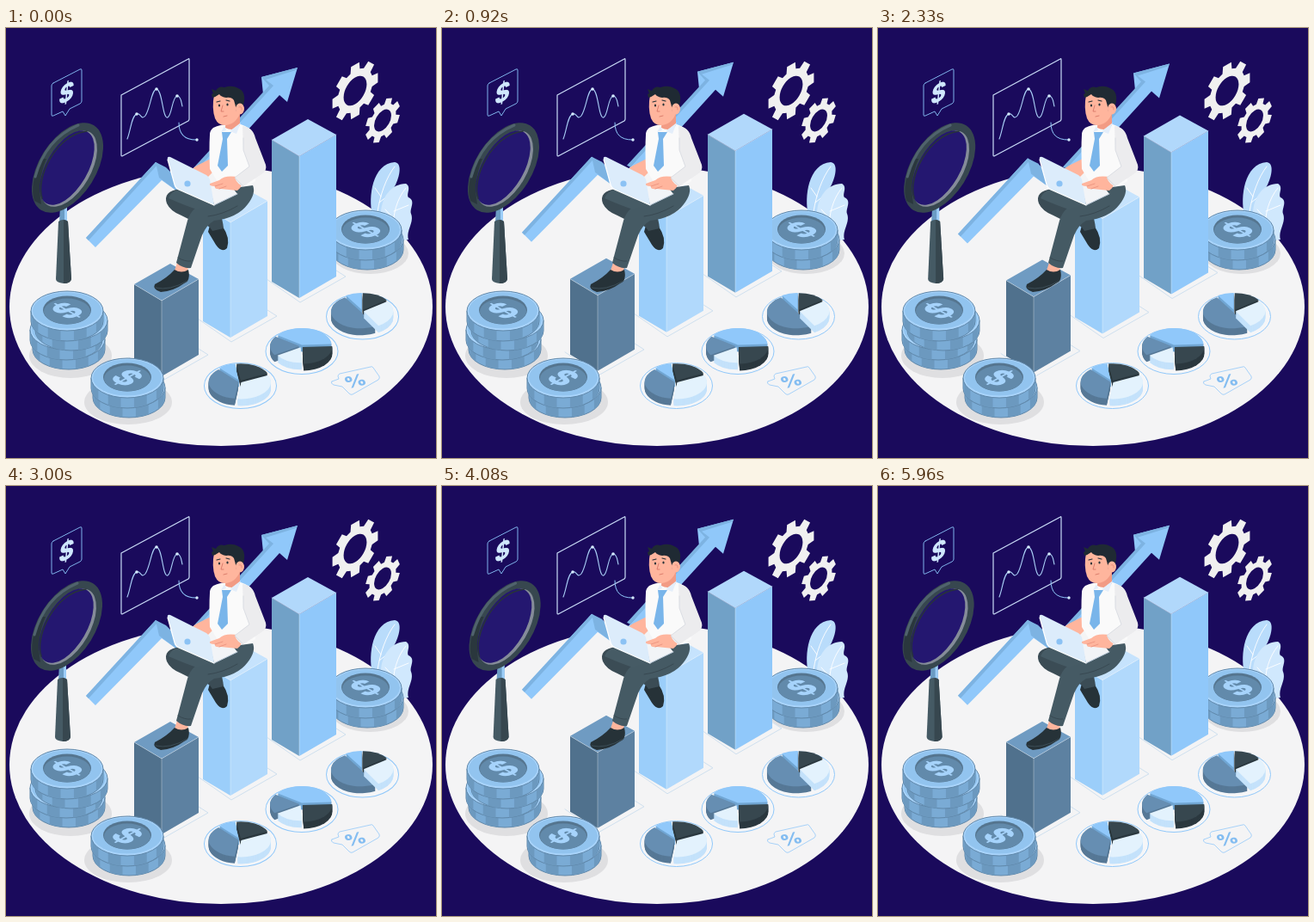
Recreate the animation shown at these times as an HTML page. Size 500 px wide and 500 px high, loop 6000 ms.

```html
<!DOCTYPE html>
<html lang="en">
<head>
<meta charset="utf-8">
<title>Business growth</title>
<style>
html, body { margin: 0; width: 100%; height: 100%; overflow: hidden; background: #1a0a5c; }
svg { display: block; width: 100%; height: 100%; }
text { font-family: Inter, Arial, sans-serif; font-weight: 800; text-anchor: middle; }
</style>
</head>
<body>
<svg id="stage" viewBox="0 0 500 500"></svg>
<script>
const path = (d, fill, extra = '') => `<path d="${d}" fill="${fill}" ${extra}/>`;
const line = (d, color, width = 1) =>
  path(d, 'none', `stroke="${color}" stroke-width="${width}" stroke-linecap="round" stroke-linejoin="round"`);
const oval = (x, y, rx, ry, fill, extra = '') =>
  `<ellipse cx="${x}" cy="${y}" rx="${rx}" ry="${ry}" fill="${fill}" ${extra}/>`;
const poly = (pts, fill, extra = '') => `<polygon points="${pts}" fill="${fill}" ${extra}/>`;
const group = (id, body) => `<g id="${id}">${body}</g>`;
const sign = (char, x, y, size, fill, matrix) =>
  `<text transform="matrix(${matrix},${x},${y})" y="${size * .36}" font-size="${size}" fill="${fill}">${char}</text>`;

const BLUE = '#90c8fa', STEEL = '#668eb2', DARK = '#37474f', PALE = '#e3f2fd';

// Isometric column: front edge x, its top and bottom, face colours
function bar(x, top, bottom, left, right, lid) {
  const back = top - 43, l = x - 32, r = x + 43;
  return line(`M${l - 6} ${bottom - 22}L${x + 1} ${bottom + 5}L${r + 11} ${bottom - 25}L${r} ${bottom - 32}`, '#cfe0ef') +
    poly([l, top - 19, x, top, x, bottom, l, bottom - 19], left) +
    poly([x, top, r, top - 25, r, bottom - 25, x, bottom], right) +
    poly([x + 10, back, r, top - 25, x, top, l, top - 19], lid) +
    line(`M${l} ${top - 19}L${x} ${top}L${r} ${top - 25}M${x} ${top}V${bottom}`, '#ffffff66', .8);
}

function slice(cx, cy, rx, ry, from, to, fill, side, h = 8) {
  const rad = Math.PI / 180, mid = (from + to) / 2 * rad;
  const point = a => [cx + Math.cos(a * rad) * rx, cy + Math.sin(a * rad) * ry];
  const dx = Math.cos(mid) * 1.9, dy = Math.sin(mid) * 1.5;
  const d = `M${cx} ${cy}L${point(from)}A${rx} ${ry} 0 ${to - from > 180 ? 1 : 0} 1 ${point(to)}Z`;
  let out = '';
  for (let i = h; i >= 0; i--)
    out += path(d, i ? side : fill, `transform="translate(${dx} ${dy + i})"`);
  return out;
}

function pie(x, y, ringY, slices) {
  const colors = { steel: [STEEL, '#567896'], blue: [BLUE, '#71a6d3'], dark: [DARK, '#2b383f'], pale: [PALE, '#c4e2fb'] };
  return oval(x + .5, ringY, 42, 26.5, '#f5f6f8', `stroke="${BLUE}"`) +
    slices.map(([name, a, b, k = 1]) => slice(x, y, 34.5 * k, 19.5 * k, a, b, ...colors[name])).join('');
}

function coin(x, y) {
  const rx = 42, ry = 23, h = 12;
  const p = t => [x + rx * Math.cos(t), y + ry * Math.sin(t)];
  const ribs = [.25, 1, 1.75, 2.5].map(a => {
    const [ax, ay] = p(a), [bx, by] = p(a + .38);
    return path(`M${ax} ${ay}A${rx} ${ry} 0 0 1 ${bx} ${by}v${h}A${rx} ${ry} 0 0 0 ${ax} ${ay + h}Z`, '#6c99bf');
  }).join('');
  return path(`M${x - rx} ${y}V${y + h}A${rx} ${ry} 0 0 0 ${x + rx} ${y + h}V${y}Z`, '#7aabd5', 'stroke="#5f87a9"') + ribs +
    oval(x, y, rx, ry, '#a9d4fb', 'stroke="#5f87a9"') +
    oval(x, y - .5, rx - 2, ry - 2, '#92c4ef');
}

function coins(layers, shadow, matrix) {
  const [x, y] = layers[layers.length - 1];
  return oval(...shadow, '#dfdfe1') + layers.map(c => coin(...c)).join('') +
    oval(x, y - 1, 28, 16.5, '#55758f') + oval(x, y + .5, 27, 15, '#628aab') +
    sign('$', x, y - .5, 37, '#a6d3fb', matrix);
}

function gear(x, y, r, hole, phase) {
  const pts = [];
  for (let i = 0; i < 8; i++)
    for (const [off, k] of [[-.27, .76], [-.18, 1], [.18, 1], [.27, .76]]) {
      const a = i * Math.PI / 4 + off + phase;
      pts.push(`${(Math.cos(a) * r * k).toFixed(2)} ${(Math.sin(a) * r * k).toFixed(2)}`);
    }
  const ring = `M${hole} 0A${hole} ${hole} 0 1 0 ${-hole} 0A${hole} ${hole} 0 1 0 ${hole} 0Z`;
  return path(`M${pts.join('L')}Z${ring}`, '#f0f0f0', `fill-rule="evenodd" transform="matrix(.866,-.5,0,1,${x},${y})"`);
}

const flatLeft = '.87,-.42,.87,.48', flatRight = '.87,.42,-.87,.48';

const bubble = line('M55 64L86 48Q88 47 88 49V85Q88 87 86 88L74 94L69 102L66 97L55 102Q53 103 53 101V67Q53 65 55 64Z', '#7fb2ea') +
  sign('$', 70.5, 75, 31, '#cfe7fd', '.87,-.42,-.1,.97');

const screen = line('M134 78L212 36Q213 35 213 37V106Q213 107 212 108L135 149Q134 149 134 148Z', '#c9dcf7', 1.2) +
  line('M141 129C145 119 146 102 152 100C157 98 157 108 162 102C168 93 169 72 175 71C182 72 182 106 188 104C193 102 193 80 199 79C204 79 204 88 205 91', '#a9cff6', 1.1) +
  [[152, 100], [175, 71], [199, 79]].map(p => oval(...p, 1.8, 1.8, '#d5eafd')).join('') +
  line('M201 110C201 124 208 130 221 130', BLUE) + oval(222, 130, 1.7, 1.7, '#d5eafd');

const plant = path('M426 218C421 196 426 158 452 156C462 157 457 176 451 186C446 198 442 208 440 220Z', '#b9dcfb') +
  line('M432 214C435 194 442 174 452 161M436 196L429 186M434 203L448 192', '#ffffff', .9) +
  path('M436 220C435 197 448 181 465 181C472 185 465 193 468 197C477 201 469 210 471 216C475 226 465 235 468 246L452 248Z', '#d0e8fd') +
  line('M450 240C449 216 455 198 465 186M450 221L441 211M451 213L468 206', '#ffffff', .9);

const arrow = poly('93,244 174,156 197,174 215,172 299,77 297,57 339,46 327,86 318,78 219,187 198,189 181,177 104,255', BLUE) +
  poly('93,244 174,156 177,158 96,247', '#7db3e2') +
  poly('174,156 186,162 200,176 198,189 178,174', '#7db3e2') +
  poly('297,57 339,46 337,49 302,60 311,67 219,168 215,166 306,67', '#7db3e2');

const bars = bar(341, 149, 314, '#71a1c7', BLUE, '#b1d8fb') +
  bar(261, 226, 360, '#9bcefa', '#b1d9fc', '#c6e3fd') +
  bar(181, 317, 405, '#50718d', '#5d81a1', '#6f9bc2');

const man =
  // far arm, torso and tie
  path('M238 152L222 160Q213 165 217 168L234 174L242 166Z', '#ffb59d') +
  path('M241 116Q249 112 259 112L273 112Q284 115 287 124L290 178Q276 191 249 184L237 164Q236 140 237 124Q237 119 241 116Z', '#fafafa') +
  path('M256 102L272 100V113Q265 121 255 116Z', '#f29b84') +
  path('M254 114L250 121L256 119ZM273 110L260 120L268 123Z', '#e4eefa') +
  path('M251 121L262 121L257 129L258 160L251 167L246 160L252 129Z', '#79b5ea') +
  // head
  path('M242 78Q239 93 243 105Q247 114 256 113Q269 111 273 96L274 82Q258 72 242 78Z', '#ffb59d') +
  path('M240 81L239 77L241 76L239 71L244 73Q247 67 254 69Q263 66 270 70Q280 74 276 90L273 96L268 97Q267 90 265 84Q262 80 256 81Q250 80 248 77Q244 80 240 81Z', '#1f2a33') +
  oval(272, 94, 5, 6.5, '#ffb59d') + line('M271 92Q274 90 274 95', '#e58a77', .8) +
  oval(248, 90, 1.1, 1.6, '#263238') + oval(257.5, 89, 1.1, 1.6, '#263238') +
  line('M245 86L249 85M256 84L260 85', '#263238', 1.2) +
  line('M252 90L250 97L253 97M253 103L257 102', '#d77868', .9) +
  // legs
  path('M239 222Q246 231 252 231Q261 244 257 256Q251 262 244 252L235 237Z', '#263238') +
  path('M202 187Q182 190 187 204Q191 213 204 218L222 227Q237 228 240 236L253 233Q251 212 240 204Z', '#3b4c55') +
  path('M199 273L212 278L210 286L196 282Z', '#ffb59d') +
  path('M287 183Q291 192 281 205Q269 221 242 224Q233 229 228 241L215 279Q206 280 198 273L211 224Q216 207 234 203L250 188Z', '#455a64') +
  path('M203 187Q191 190 189 198Q207 206 222 211L241 204Q224 190 203 187Z', '#465b65') +
  line('M269 207Q252 217 235 219M215 271Q208 272 200 267', '#35454d', .8) +
  path('M196 281Q204 286 212 281Q215 294 207 297Q195 306 180 307Q170 304 173 298Q187 291 196 281Z', '#263238') +
  line('M174 302Q190 306 211 294', '#3c4d56') +
  // laptop
  poly('242,206 269,193 262,184 236,181', '#f2f4f7') +
  line('M242 206L269 193', '#b9c8d7') +
  path('M188 153Q187 149 191 150L233 171Q236 173 237 176L242 206L201 188Q197 186 196 182Z', '#dcecfb') +
  line('M188 153L196 182Q197 186 201 188L242 206', '#ffffff', 1.2) +
  oval(211, 181, 3.6, 3.6, '#8bc2f4') +
  // near arm
  path('M272 174Q256 170 248 177L237 181Q236 184 243 184Q242 188 250 187L269 189Q277 184 272 174Z', '#ffb59d') +
  line('M243 184L252 181M248 187L256 184', '#e58a77', .7) +
  path('M275 114Q287 115 290 128L302 159Q304 166 297 170L276 184Q269 182 266 174L283 161L276 142Z', '#ececee') +
  line('M276 128L276 142L283 161L266 174L276 184', '#d5d9df', .8);

const pies =
  pie(414, 329, 335.5, [['blue', 238, 270], ['dark', 270, 324], ['steel', 60, 238], ['pale', 324, 420]]) +
  pie(343.5, 370, 376, [['blue', 215, 357], ['steel', 148, 215], ['pale', 88, 148, .92], ['dark', 357, 448]]) +
  pie(272, 411, 416, [['blue', 228, 262], ['dark', 262, 335], ['steel', 97, 228], ['pale', 335, 457]]);

const percent = line('M379 411L387 408L386 405Q386 403 388 402L424 394Q426 393 427 395L434 405Q435 407 433 409L403 426Q401 427 399 425L391 417L381 415Q377 413 379 411Z', '#a7d2f9') +
  sign('%', 406, 410.5, 25, '#84bdf1', '.95,-.24,.3,.72');

const magnifier =
  path('M63 206H71V226H62Z', '#6b9cc4') + path('M68 206H71V226H68Z', '#9ccdf8') +
  path('M61 225Q66 221 72 225L76 292Q75 297 67 297Q58 296 58 292Z', '#455a64') +
  path('M67 223Q70 223 72 225L76 292Q75 297 67 297Z', DARK) +
  oval(71.5, 162.5, 33, 58, DARK, 'transform="rotate(32 71.5 162.5)"') +
  path('M33 201Q27 182 41 152L47 152Q36 178 41 205Z', '#2a373d') +
  line('M34 173Q46 129 84 113', '#50636d', 3) +
  oval(73, 163.5, 25.5, 49, '#858c99', 'transform="rotate(30 73 163.5)"') +
  oval(71, 162.5, 24, 48, '#241770', 'transform="rotate(30 71 162.5)"') +
  line('M42 198C34 174 58 124 94 120', '#28343a', 1.5);

const stage = document.getElementById('stage');
stage.innerHTML =
  oval(250, 324, 246, 162, '#f4f4f5') + bubble + group('screen', screen) +
  gear(406, 73, 31, 15.5, 0) + gear(438, 107.5, 23.5, 11.5, Math.PI / 8) + plant +
  coins([[420, 246], [418, 235]], [423, 262, 45, 24], flatLeft) +
  group('arrow', arrow) + group('bars', bars) + man + group('pies', pies) + percent +
  coins([[73, 362], [70, 351], [76, 340], [71, 329]], [75, 381, 48, 26], flatLeft) +
  coins([[143, 418], [141, 407]], [142, 435, 51, 26], flatRight) +
  group('magnifier', magnifier);

// Linear interpolation between [position, value] stops
function track(p, stops) {
  const i = stops.findIndex(s => s[0] >= p);
  if (i < 1) return stops[0][1];
  const [a, u] = stops[i - 1], [b, v] = stops[i];
  return u + (v - u) * (p - a) / (b - a);
}
const FLOAT = [[0, 0], [.5, -10], [1, 0]];
const BEAT = [[0, 1], [.1, 1.1], [.3, 1], [.4, 1], [.5, 1.1], [.6, 1], [1, 1]];
const SHAKE = [[0, 0], [.1, -1], [.2, 2], [.3, -4], [.4, 4], [.5, -4], [.6, 4], [.7, -4], [.8, 2], [.9, -1], [1, 0]];

const pose = (id, value) => document.getElementById(id).setAttribute('transform', value);
const zoom = (x, y, s) => `translate(${x} ${y}) scale(${s}) translate(${-x} ${-y})`;
const start = performance.now();

function draw() {
  const t = (performance.now() - start) % 6000, p = t % 3000 / 3000;
  const rise = `translate(0 ${track(p, FLOAT)})`, beat = track(p, BEAT);
  pose('arrow', rise);
  pose('bars', rise);
  pose('screen', zoom(179, 92, beat));
  pose('pies', zoom(343, 376, beat));
  pose('magnifier', `translate(${track(Math.max(0, t - 1500) / 6000, SHAKE)} 0)`);
  requestAnimationFrame(draw);
}
draw();
</script>
</body>
</html>
```
